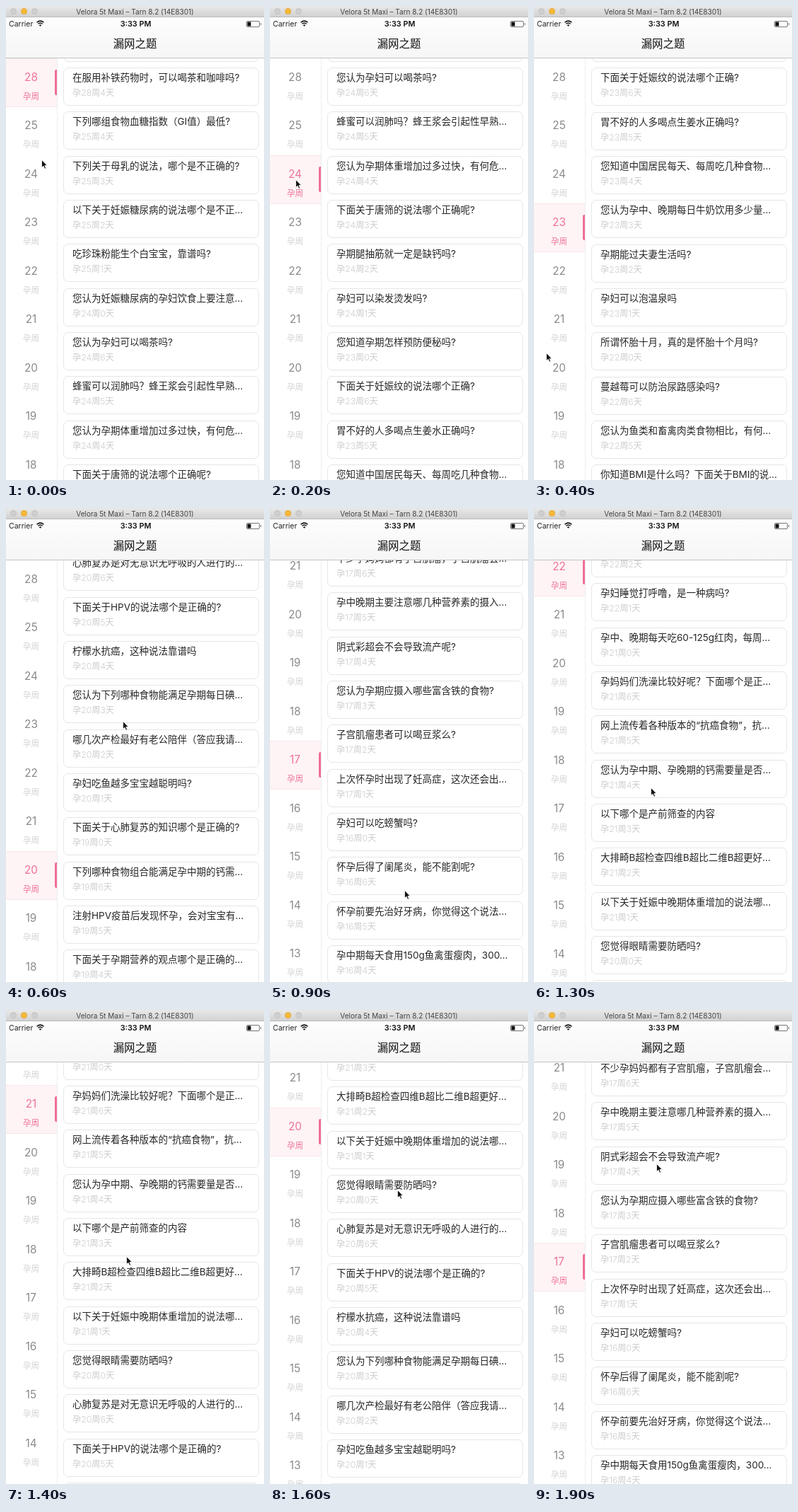
Recreate the animation shown at these times as an HTML page. Size 365x670 px, loop 2 s.

```html
<!DOCTYPE html>
<html lang="zh-CN">
<head>
<meta charset="utf-8">
<style>
html, body { margin: 0; width: 100%; height: 100%; overflow: hidden; background: #fff; }
#stage { position: relative; width: 365px; height: 670px; overflow: hidden; background: #fff;
  font-family: Inter, "Noto Sans CJK SC", "Noto Sans CJK", sans-serif; white-space: nowrap; }
#stage * { position: absolute; box-sizing: border-box; }
.card { left: 81px; width: 277px; height: 54px; border: 1px solid #e6e6e6; border-radius: 7px; }
.card b, .card i { left: 12px; line-height: 20px; font-style: normal; font-weight: 400; }
.card b { top: 3px; font-size: 13.5px; color: #262626; }
.card i { top: 25px; font-size: 12.2px; font-weight: 300; color: #ccc; }
#divider { left: 72px; top: 73px; width: 1px; height: 597px; background: #eee; }
.week { left: 0; width: 72px; height: 69px; border: solid transparent; border-width: 1px 0; text-align: center; }
.week b, .week i { left: 0; width: 71px; line-height: 20px; font-style: normal; font-weight: 400; }
.week b { top: 16px; font-size: 15.3px; color: #8a8a8a; }
.week i { top: 43px; font-size: 11.6px; font-weight: 300; color: #d2d2d2; }
.week u { display: none; left: 69px; top: 15px; width: 3px; height: 36px; border-radius: 2px 0 0 2px; background: #ee6f94; }
.on { background: #fef3f5; border-color: #f8e6ea; }
.on b, .on i { color: #ee7398; }
.on i { font-weight: 400; }
.on u { display: block; }
#nav { left: 0; top: 16px; width: 365px; height: 58px; background: linear-gradient(#fdfdfd, #f6f6f6); border-bottom: 1px solid #c4c4c4; }
#window { left: 0; top: 0; width: 365px; height: 16px; background: linear-gradient(#e8e8e8, #d2d2d2); border-bottom: 1px solid #bcbcbc; }
.mid { left: 0; width: 365px; line-height: 16px; text-align: center; }
.dot { top: 3px; width: 9px; height: 9px; border-radius: 50%; background: #cfcfcf; border: 1px solid #c2c2c2; }
.dot.amber { background: #f6b93b; border-color: #e2a530; }
svg { left: 0; top: 0; }
</style>
</head>
<body>
<div id="stage">
  <div id="list"></div>
  <div id="divider"></div>
  <div id="side"></div>
  <div id="nav">
    <span style="left:4px;top:2px;font-size:10.5px;line-height:16px;color:#222">Carrier</span>
    <span class="mid" style="top:2px;left:1px;font-size:10.8px;font-weight:600;color:#111">3:33 PM</span>
    <span class="mid" style="top:28px;line-height:20px;font-size:15.4px;font-weight:500;color:#111">漏网之题</span>
    <svg width="365" height="57" fill="none" stroke="#111">
      <path d="M43.5 7.3Q48.5 3 53.5 7.3M45.3 9.3Q48.5 6.6 51.7 9.3" stroke-width="1.5"/>
      <path d="M46.7 10.9Q48.5 9.6 50.3 10.9L48.5 12.8Z" fill="#111" stroke="none"/>
      <rect x="340.5" y="5.5" width="18" height="8" rx="1.5" stroke="#777"/>
      <path d="M341.5 6.5h5v6h-5z" fill="#111" stroke="none"/>
      <path d="M360.5 8v3" stroke="#777"/>
    </svg>
  </div>
  <div id="window">
    <span class="dot" style="left:6px"></span>
    <span class="dot amber" style="left:21px"></span>
    <span class="dot" style="left:36px"></span>
    <span class="mid" style="top:0;font-size:10px;color:#444">Velora 5t Maxi – Tarn 8.2 (14E8301)</span>
  </div>
  <svg id="cursor" width="12" height="17"><path d="M.5.5V11.5L3 9.2 4.8 13.2 6.6 12.4 4.9 8.5H8.2Z" fill="#111" stroke="#fff" stroke-width=".8"/></svg>
</div>
<script>
const questions = `孕晚期出现水肿应该怎么办?
在服用补铁药物时，可以喝茶和咖啡吗?
下列哪组食物血糖指数（GI值）最低?
下列关于母乳的说法，哪个是不正确的?
以下关于妊娠糖尿病的说法哪个是不正…
吃珍珠粉能生个白宝宝，靠谱吗?
您认为妊娠糖尿病的孕妇饮食上要注意…
您认为孕妇可以喝茶吗?
蜂蜜可以润肺吗？蜂王浆会引起性早熟…
您认为孕期体重增加过多过快，有何危…
下面关于唐筛的说法哪个正确呢?
孕期腿抽筋就一定是缺钙吗?
孕妇可以染发烫发吗?
您知道孕期怎样预防便秘吗?
下面关于妊娠纹的说法哪个正确?
胃不好的人多喝点生姜水正确吗?
您知道中国居民每天、每周吃几种食物…
您认为孕中、晚期每日牛奶饮用多少量…
孕期能过夫妻生活吗?
孕妇可以泡温泉吗
所谓怀胎十月，真的是怀胎十个月吗?
蔓越莓可以防治尿路感染吗?
您认为鱼类和畜禽肉类食物相比，有何…
你知道BMI是什么吗？下面关于BMI的说…
孕妇可以坐飞机出行吗?
孕期感冒了可以吃药吗?
孕妇睡觉打呼噜，是一种病吗?
孕中、晚期每天吃60-125g红肉，每周…
孕妈妈们洗澡比较好呢？下面哪个是正…
网上流传着各种版本的“抗癌食物”，抗…
您认为孕中期、孕晚期的钙需要量是否…
以下哪个是产前筛查的内容
大排畸B超检查四维B超比二维B超更好…
以下关于妊娠中晚期体重增加的说法哪…
您觉得眼睛需要防晒吗?
心肺复苏是对无意识无呼吸的人进行的…
下面关于HPV的说法哪个是正确的?
柠檬水抗癌，这种说法靠谱吗
您认为下列哪种食物能满足孕期每日碘…
哪几次产检最好有老公陪伴（答应我请…
孕妇吃鱼越多宝宝越聪明吗?
下面关于心肺复苏的知识哪个是正确的?
下列哪种食物组合能满足孕中期的钙需…
注射HPV疫苗后发现怀孕，会对宝宝有…
下面关于孕期营养的观点哪个是正确的…
孕期运动有哪些好处?
孕妇可以养猫吗?
下列哪种食物含叶酸最多?
您知道胎动从什么时候开始吗?
孕期可以用护肤品吗?
喝骨头汤真的能补钙吗?
孕妇可以吃辣吗?
关于孕期睡姿，下面哪个说法正确?
孕期贫血对宝宝有什么影响?
孕妇每天应该喝多少水?
孕期可以看牙医吗?
不少孕妈妈都有子宫肌瘤，子宫肌瘤会…
孕中晚期主要注意哪几种营养素的摄入…
阴式彩超会不会导致流产呢?
您认为孕期应摄入哪些富含铁的食物?
子宫肌瘤患者可以喝豆浆么?
上次怀孕时出现了妊高症，这次还会出…
孕妇可以吃螃蟹吗?
怀孕后得了阑尾炎，能不能割呢?
怀孕前要先治好牙病，你觉得这个说法…
孕中期每天食用150g鱼禽蛋瘦肉，300…`.split("\n");
const weeks = [28, 25, 24, 23, 22, 21, 20, 19, 18, 17, 16, 15, 14, 13];
const CARD_PITCH = 62.33, WEEK_PITCH = 68.5, STEP = 100, LOOP = 2000;
const $ = id => document.getElementById(id);

// Days count down 0, 6, 5 … 1 within each week.
function age(i) {
  if (i < 2) return `孕28周${5 - i}天`;
  const n = i - 6;
  return `孕${24 - Math.floor(n / 7)}周${(7 - (n + 7) % 7) % 7}天`;
}

$("list").innerHTML = questions.map((q, i) =>
  `<div class="card" style="top:${87 + (i - 1) * CARD_PITCH}px"><b>${q}</b><i>${age(i)}</i></div>`).join("");
$("side").innerHTML = weeks.map((w, i) =>
  `<div class="week" style="top:${73.5 + i * WEEK_PITCH}px"><b>${w}</b><i>孕周</i><u></u></div>`).join("");
const rows = [...$("side").children];

// time, list scroll, sidebar scroll, selected row, cursor x, cursor y
const keys = [
  [0, 0, 0, 0, 50, 217],
  [200, 374, 0, 2, 36, 245],
  [300, 700, 0, 3, 28, 320],
  [400, 810, 0, 3, 17, 490],
  [500, 2119, 0, 6, 40, 480],
  [600, 2143, 0, 6, 165, 301],
  [800, 3030, 361, 8, 182, 470],
  [900, 3458, 361, 9, 190, 540],
  [1200, 2000, 345, 5, 170, 420],
  [1300, 1539, 292, 4, 165, 395],
  [1600, 1911, 347, 6, 180, 254],
  [1700, 2420, 361, 7, 178, 240],
  [1900, 3447, 361, 9, 173, 217],
];

function poseAt(time) {
  const next = keys.findIndex(k => k[0] > time);
  if (next < 0) return keys[keys.length - 1];
  const a = keys[next - 1], b = keys[next];
  const p = (time - a[0]) / (b[0] - a[0]);
  return a.map((v, i) => v + (b[i] - v) * p);
}

function move(id, x, y) {
  $(id).style.transform = `translate(${Math.round(x)}px, ${Math.round(y)}px)`;
}

function draw() {
  const time = Math.floor(performance.now() % LOOP / STEP) * STEP;
  const [, scroll, side, row, x, y] = poseAt(time);
  move("list", 0, -scroll);
  move("side", 0, -side);
  move("cursor", x, y);
  rows.forEach((el, i) => el.classList.toggle("on", i === Math.round(row)));
  requestAnimationFrame(draw);
}
draw();
</script>
</body>
</html>
```
